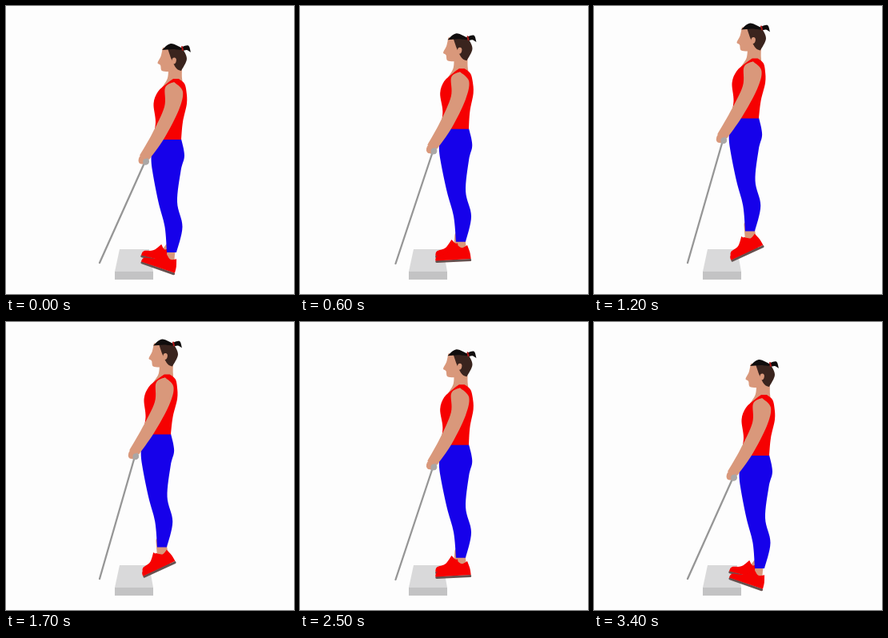
An HTML page with a canvas for the animation above (3500 ms loop, 360 by 360 pixels).

```html
<!DOCTYPE html>
<html lang="en">
<head>
<meta charset="utf-8">
<title>Heel raise</title>
<style>
html, body { margin: 0; width: 100%; height: 100%; overflow: hidden; background: #fdfdfd; }
canvas { display: block; }
</style>
</head>
<body>
<canvas id="stage" width="360" height="360"></canvas>
<script>
const ctx = document.getElementById('stage').getContext('2d');
const LOOP = 3500, STEP = 100;
const SKIN = '#d9987b', RED = '#f60101', BLUE = '#1601ea', HAIR = '#3a241e', BLACK = '#100d0d';

const clamp = (v, a, b) => Math.max(a, Math.min(b, v));
const mix = (a, b, k) => a + (b - a) * k;
const smooth = (a, b, t) => {
  const u = clamp((t - a) / (b - a), 0, 1);
  return u * u * (3 - 2 * u);
};

// 0 = heels hanging below the block, 1 = on tiptoe
const liftAt = t => smooth(0, 1200, t) - smooth(1700, 3300, t);

// Shifts a standing-pose point: head, hips and ankles drift by different amounts
function bodyWarp(lift) {
  const headX = -11 * lift - 5 * Math.sin(Math.PI * lift);
  const hipX = -13 * Math.pow(lift, 0.7), ankleX = -12 * lift;
  return ([x, y]) => {
    const torso = clamp((y - 82) / 85, 0, 1), leg = clamp((y - 167) / 141, 0, 1);
    return [x + mix(mix(headX, hipX, torso), ankleX, leg), y - mix(25.5, 26.5, torso) * lift];
  };
}

// Toe-based shoe coordinates to stage
function shoeWarp(angle, x, y, scale) {
  const c = Math.cos(angle), s = Math.sin(angle);
  return ([px, py]) => [x + px * scale * c - py * s, y + px * scale * s + py * c];
}

// Smooth open curves, joined at corners into one filled outline
function shape(color, warp, ...curves) {
  ctx.beginPath();
  for (const curve of curves) {
    const pts = curve.map(warp), at = i => pts[clamp(i, 0, pts.length - 1)];
    ctx.lineTo(...pts[0]);
    for (let i = 0; i < pts.length - 1; i++) {
      const [a, b, c, d] = [at(i - 1), at(i), at(i + 1), at(i + 2)];
      ctx.bezierCurveTo(b[0] + (c[0] - a[0]) / 6, b[1] + (c[1] - a[1]) / 6,
        c[0] - (d[0] - b[0]) / 6, c[1] - (d[1] - b[1]) / 6, c[0], c[1]);
    }
  }
  ctx.fillStyle = color;
  ctx.fill();
}

// Outline from rows of [y, front, back]
function profile(color, warp, ...rows) {
  shape(color, warp, rows.map(r => [r[1], r[0]]), rows.map(r => [r[2], r[0]]).reverse());
}

function line(a, b, width, color, cap = 'round') {
  ctx.beginPath();
  ctx.moveTo(...a);
  ctx.lineTo(...b);
  ctx.lineWidth = width;
  ctx.lineCap = cap;
  ctx.strokeStyle = color;
  ctx.stroke();
}

function dot(p, rx, ry, tilt, color) {
  ctx.beginPath();
  ctx.ellipse(p[0], p[1], rx, ry, tilt, 0, 2 * Math.PI);
  ctx.fillStyle = color;
  ctx.fill();
}

function block() {
  const same = p => p;
  shape('#d9d9da', same, [[142, 304]], [[179, 304]], [[184, 332]], [[136, 332]]);
  ctx.fillStyle = '#c3c3c4';
  ctx.fillRect(136, 332, 48, 10);
}

function shoe(warp) {
  line(warp([1, 0]), warp([43, -0.5]), 3, '#66514f');
  shape(RED, warp, [[-0.5, -1], [2, -7], [16, -11], [26, -21]],
    [[26, -21], [33, -16], [40, -19]], [[40, -19], [43, -10], [44, -2]]);
}

function feet(lift, w) {
  const angle = (20 - 44 * lift) * Math.PI / 180;
  const x = 169 + 3 * lift * lift, y = 320.5 - 2 * lift;
  const far = shoeWarp(angle * 0.8, x, y - 8 + 4 * lift, 0.78);
  const near = shoeWarp(angle, x, y, 1);
  line(w([203, 300]), far([34, -14]), 7, SKIN);
  shoe(far);
  line(w([207, 300]), near([34, -12]), 10, SKIN);
  shoe(near);
}

function head(w) {
  profile(SKIN, w, [76, 203, 220], [90, 202, 220], [102, 195, 222]);
  shape(SKIN, w, [[196, 52], [193.5, 63], [189.5, 71], [193, 74], [195, 81], [205, 82]],
    [[218, 78], [221, 54]]);
  shape(HAIR, w, [[202, 53], [207, 67], [213, 78], [219, 81]],
    [[219, 81], [226, 66], [220, 52]]);
  dot(w([210, 68.5]), 2.8, 4, 0.2, SKIN);
  shape(BLACK, w, [[195, 55], [206, 47], [221, 53]], [[219, 55], [208, 54]]);
  shape(BLACK, w, [[220, 51], [228, 49.5], [231, 58]], [[231, 58], [226, 55], [221, 56]]);
  line(w([220, 51]), w([221, 55]), 2, '#b01818');
}

function body(w) {
  profile(BLUE, w, [166, 183, 219], [187, 181.5, 223], [206, 183, 218.5],
    [245, 190.5, 214], [276, 198.5, 220.5], [308, 201, 213]);
  profile(RED, w, [91, 209, 216], [97, 201, 223], [107, 190, 225.5],
    [122, 184.5, 226], [145, 187, 221], [167, 183.5, 219]);
}

// Left and right edge of the arm, from shoulder to wrist
function arm(w) {
  shape(SKIN, w,
    [[210, 95], [199, 102], [198, 126], [183, 159], [167, 187]],
    [[179, 192], [198, 165], [216, 130], [221, 107], [210, 95]]);
}

function draw(t) {
  const lift = liftAt(t), w = bodyWarp(lift), sway = Math.sin(Math.PI * lift);
  const grip = w([174, 194]);
  ctx.fillStyle = '#fdfdfd';
  ctx.fillRect(0, 0, 360, 360);
  block();
  feet(lift, w);
  head(w);
  body(w);
  arm(w);
  line(grip, [117 + 2.5 * sway, 321 + sway], 2.3, '#969696');
  dot(grip, 4.8, 4.8, 0, '#aaa7a6');
  dot(w([171, 191]), 7, 4.8, 2.1, SKIN);
  dot(w([175, 194.5]), 3.8, 3.8, 0, '#aaa7a6');
}

const start = performance.now();
function tick() {
  const t = (performance.now() - start) % LOOP;
  draw(Math.floor(t / STEP) * STEP);
  requestAnimationFrame(tick);
}
tick();
</script>
</body>
</html>
```
